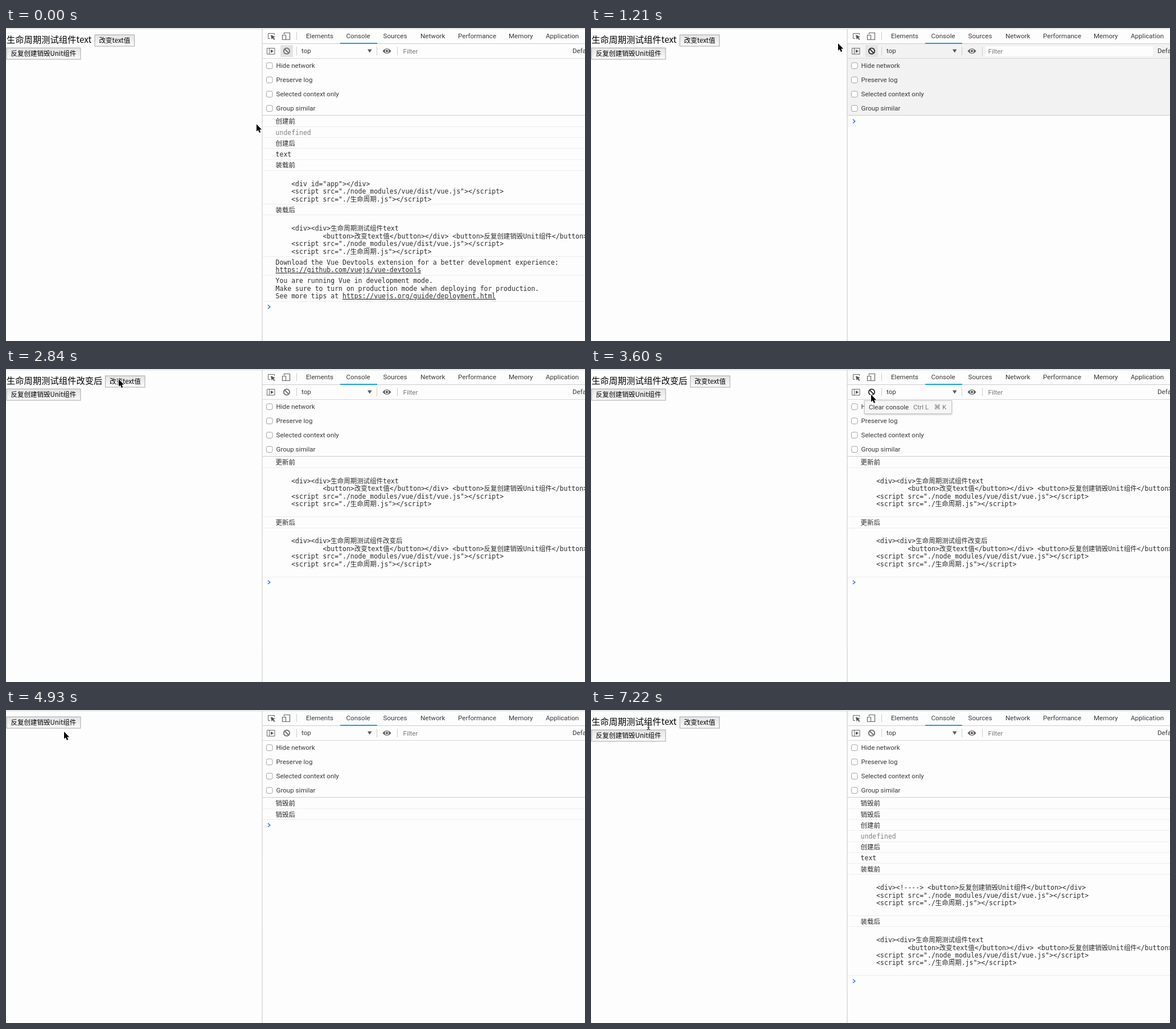
Recreate the animation shown at these times as an HTML page. Size 1017 px wide and 550 px high, loop 8 s.

```html
<!DOCTYPE html>
<html lang="zh">
<head>
<meta charset="utf-8">
<title>Lifecycle</title>
<style>
html, body { margin: 0; width: 100%; height: 100%; overflow: hidden; background: #fdfdfd; }
svg { display: block; }
.ui { font: 11.6px Roboto, "DejaVu Sans", sans-serif; fill: #383838; }
.btn { font: 11.5px "Noto Sans CJK SC", "Noto Sans CJK JP", sans-serif; fill: #000; }
.label { font: 15.3px "Noto Sans CJK SC", "Noto Sans CJK JP", sans-serif; fill: #000; }
.log { font: 11.47px "DejaVu Sans Mono", "Noto Sans CJK SC", "Noto Sans CJK JP", monospace; fill: #2a2a2a; }
.ui.dim { fill: #777; }
.log.dim { fill: #808080; }
.off { display: none; }
</style>
</head>
<body>
<svg id="stage" width="1017" height="550" viewBox="0 0 1017 550">
  <defs>
    <linearGradient id="up" x2="0" y2="1"><stop stop-color="#e4e4e4"/><stop offset="1" stop-color="#fafafa"/></linearGradient>
    <linearGradient id="down" x2="0" y2="1"><stop stop-color="#c9c9c9"/><stop offset="1" stop-color="#dedede"/></linearGradient>
    <filter id="soft" x="-10%" y="-30%" width="120%" height="180%"><feDropShadow dx="0" dy="1" stdDeviation="1.5" flood-opacity=".25"/></filter>
  </defs>
  <rect width="1017" height="550" fill="#fdfdfd"/>
</svg>
<script>
const NS = "http://www.w3.org/2000/svg";
const stage = document.getElementById("stage");

function add(parent, tag, attrs = {}, text) {
  const el = document.createElementNS(NS, tag);
  for (const k in attrs) el.setAttribute(k, attrs[k]);
  if (text !== undefined) el.textContent = text;
  parent.appendChild(el);
  return el;
}
const group = (parent = stage) => add(parent, "g");
const rect = (p, x, y, width, height, fill, more) => add(p, "rect", { x, y, width, height, fill, ...more });
const text = (p, cls, x, y, str) => add(p, "text", { class: cls, x, y }, str);
const path = (p, d, stroke, more) => add(p, "path", { d, stroke, fill: "none", ...more });
const shape = (d, fill) => path(stage, d, "none", { fill });
const show = (el, on) => el.classList.toggle("off", !on);

// Page on the left
const PAGE_NAME = "生命周期测试组件";
const TOGGLE = "反复创建销毁Unit组件";
const CHANGE = "改变text值";

function button(p, x, y, w, str) {
  const box = rect(p, x + .5, y + .5, w, 20, "url(#up)", { stroke: "#a6a6a6" });
  text(p, "btn", x + 8, y + 14.2, str);
  return box;
}
function fullPage(value, x) {
  const g = group();
  text(g, "label", 1, 25.7, PAGE_NAME + value);
  const change = button(g, x, 11.5, 69.5, CHANGE);
  const toggle = button(g, .5, 34.5, 130, TOGGLE);
  return { g, change, toggle };
}
function emptyPage() {
  const g = group();
  return { g, toggle: button(g, .5, 11.5, 130, TOGGLE) };
}
const pages = [fullPage("text", 155.5), fullPage("改变后", 174), emptyPage()];

// Developer tools frame
rect(stage, 0, 1, 1017, 1, "#cfcfcf");
const grey = group();
rect(grey, 450, 28, 567, 125, "#f2f2f2");
rect(grey, 693, 32, 294, 18, "#fdfdfd");
rect(stage, 449.5, 2, 1, 548, "#c6c6c6");
for (const y of [27, 53, 153]) rect(stage, 450, y, 567, 1, y === 53 ? "#d8d8d8" : "#cccccc");

const tabs = { Elements: 527, Console: 597.5, Sources: 662.5, Network: 728, Performance: 794, Memory: 883, Application: 948 };
for (const name in tabs) text(stage, "ui", tabs[name], 18, name);
rect(stage, 587, 26, 65, 2, "#1a9fe0");

const line = "#666";
path(stage, "M464 18.5H460.5V9.5H471.5V12", line);
shape("M465 12L473 15.5L469.8 16.6L472.5 19.8L471 21L468.4 17.7L466.5 20Z", "#555");
path(stage, "M488.5 11V8.5H498.5V20.5H492M485.5 12.5H491.5V20.5H485.5Z", line, { "stroke-width": 1.2 });
for (const [x, y, h] of [[510, 7, 14], [510, 33, 15], [651, 33, 15], [687, 33, 15]]) rect(stage, x, y, 1, h, "#ccc");

path(stage, "M459 35.5H472V46H458.5V35.5M462.5 35.5V46", line);
shape("M465 37.7L470 40.7L465 43.7Z", "#555");
const hover = rect(stage, 482, 30, 22, 21, "#e3e3e3");
const clear = path(stage, "M487.8 40.5a5.2 5.2 0 1 0 10.4 0a5.2 5.2 0 1 0 -10.4 0M489.4 36.9L496.6 44.1", line, { "stroke-width": 1.7 });
text(stage, "ui", 519, 44, "top");
shape("M635 37.5H642.5L638.75 43.5Z", "#5a5a5a");
shape("M661.5 40.5Q669 31.5 676.5 40.5Q669 49.5 661.5 40.5Z", "#5a5a5a");
add(stage, "circle", { cx: 669, cy: 40.5, r: 2.8, fill: "#5a5a5a", stroke: "#fff", "stroke-width": 1.3 });
text(stage, "ui dim", 697.5, 44.5, "Filter");
text(stage, "ui", 995, 44, "Default levels");

["Hide network", "Preserve log", "Selected context only", "Group similar"].forEach((name, i) => {
  const y = 66 + 25 * i;
  rect(stage, 457.5, y - 5, 10.5, 10.5, "#fff", { rx: 2.5, stroke: "#a3a3a3" });
  text(stage, "ui", 474.5, y + 4, name);
});

// Console output
const LEFT = 473.6, CHAR = 6.907, LINE = 13.4;

function writeLine(g, y, str) {
  const indent = str.length - str.trimStart().length;
  const cls = str === "undefined" ? "log dim" : "log";
  const el = text(g, cls, LEFT + indent * CHAR, y);
  for (const part of str.trim().split(/(?=https:)/))
    add(el, "tspan", part.startsWith("https:") ? { "text-decoration": "underline" } : {}, part);
}
function consoleLog(entries) {
  const g = group();
  let top = 154.4;
  for (const entry of entries) {
    const lines = entry.split("\n");
    lines.forEach((s, i) => s && writeLine(g, top + 13.9 + LINE * i, s));
    top += lines.length * LINE + 5.8;
    rect(g, 451, Math.round(top - .5), 566, 1, "#ededed");
  }
  path(g, `M460 ${top + 6.3}L463.8 ${top + 9.5}L460 ${top + 12.7}`, "#3b7ded", { "stroke-width": 1.6 });
  return g;
}
const tag = file => `    \x3cscript src="./${file}">\x3c/script>`;
const tags = tag("node_modules/vue/dist/vue.js") + "\n" + tag("生命周期.js");
const markup = value => `\n    <div><div>${PAGE_NAME}${value}\n            <button>${CHANGE}</button></div> <button>${TOGGLE}</button></div>\n${tags}`;
const created = ["创建前", "undefined", "创建后", "text", "装载前"];
const destroyed = ["销毁前", "销毁后"];

const logs = [
  [...created, `\n    <div id="app"></div>\n${tags}`, "装载后", markup("text"),
    "Download the Vue Devtools extension for a better development experience:\nhttps://github.com/vuejs/vue-devtools",
    "You are running Vue in development mode.\nMake sure to turn on production mode when deploying for production.\nSee more tips at https://vuejs.org/guide/deployment.html"],
  [],
  ["更新前", markup("text") + "\n", "更新后", markup("改变后") + "\n"],
  destroyed,
  [...destroyed, ...created, `\n    <div>\x3c!----> <button>${TOGGLE}</button></div>\n${tags}\n`, "装载后", markup("text") + "\n"]
].map(consoleLog);

// Tooltip and pointers
const tip = group();
rect(tip, 480.5, 55.5, 153, 23, "#f6f6f6", { stroke: "#c8c8c8", filter: "url(#soft)" });
text(tip, "ui", 488, 71, "Clear console");
text(tip, "ui dim", 566, 71, "Ctrl L");
text(tip, "ui dim", 602.5, 71, "⌘ K");

const arrow = path(stage, "M0 0V12.8L2.9 10.2L4.9 15L7.3 14L5.2 9.4H9.2Z", "#fff", { style: "fill:#000", "paint-order": "stroke", "stroke-width": 1.8 });
const beam = path(stage, "M98 22.5Q101 22.5 101 24.5Q101 22.5 104 22.5M101 24V33M98 34.5Q101 34.5 101 32.5Q101 34.5 104 34.5M99 30.5H103", "#222");

// start, page, log, grey panel
const scenes = [
  [0, 0, 0, false],
  [660, 0, 1, true],
  [1700, 1, 2, false],
  [3660, 1, 1, true],
  [4760, 2, 3, false],
  [7160, 0, 4, false]
];
// start, number of steps, end point
const moves = [
  [240, 6, 490, 42], [720, 5, 438, 33], [1210, 1, 434, 27], [1300, 5, 198, 18],
  [2900, 4, 448, 37], [3250, 4, 492, 45], [3720, 5, 250, 36], [4170, 5, 103, 39],
  [4700, 1, 102, 38], [6240, 3, 101, 41], [6460, 4, 101, 24]
];
const STEP = 60, LOOP = 8000;
const within = (t, a, b) => t >= a && t < b;

function pointer(t) {
  let x = 440, y = 169;
  for (const [start, steps, toX, toY] of moves) {
    if (t < start) break;
    const u = Math.min(1, (Math.floor((t - start) / STEP) + 1) / steps);
    const e = (1 - Math.cos(Math.PI * u)) / 2;
    x += (toX - x) * e;
    y += (toY - y) * e;
  }
  return [x, y];
}

function draw(t) {
  const [, page, log, isGrey] = scenes.filter(s => t >= s[0]).pop();
  pages.forEach((p, i) => show(p.g, i === page));
  logs.forEach((g, i) => show(g, i === log));
  show(grey, isGrey);
  show(hover, t < 1700);
  show(tip, within(t, 3550, 3660));
  clear.setAttribute("stroke", within(t, 540, 1700) || within(t, 3430, 3780) ? "#222" : line);

  const press = (box, on) => box.setAttribute("fill", on ? "url(#down)" : "url(#up)");
  press(pages[0].change, within(t, 1600, 1700));
  press(pages[1].toggle, within(t, 4640, 4760));
  press(pages[2].toggle, within(t, 6870, 6980));

  const [x, y] = pointer(t);
  arrow.setAttribute("transform", `translate(${x.toFixed(1)} ${y.toFixed(1)})`);
  show(arrow, t < 7220);
  show(beam, t >= 7220);
}

function tick() {
  draw(performance.now() % LOOP);
  requestAnimationFrame(tick);
}
tick();
</script>
</body>
</html>
```
